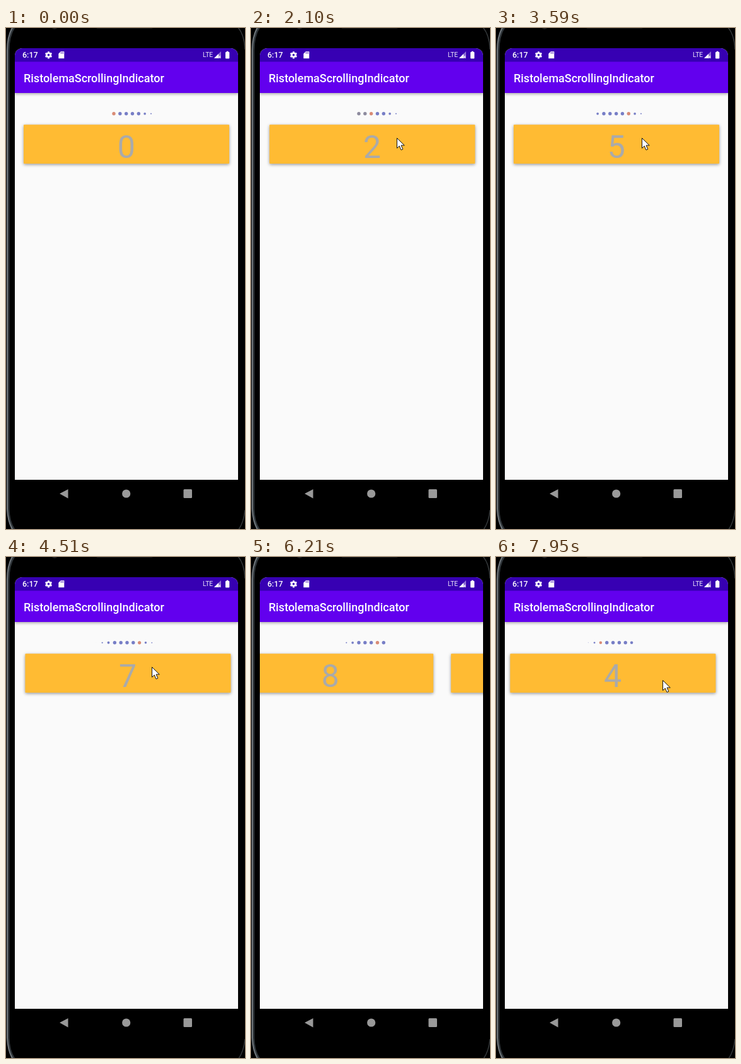
An HTML page with a canvas for the animation above (8000 ms loop, 379 px wide and 794 px high).

```html
<!DOCTYPE html>
<html lang="en">
<head>
<meta charset="utf-8">
<title>Pager with scrolling dots</title>
<style>
  html, body { margin: 0; width: 100%; height: 100%; overflow: hidden; background: #000; }
  canvas { display: block; }
</style>
</head>
<body>
<canvas id="stage" width="379" height="794"></canvas>
<script>
const ctx = document.getElementById('stage').getContext('2d');
const LOOP = 8000, PAGES = 10, PITCH = 354, DOT_PITCH = 9.83;
const SELECT_DELAY = 165, WINDOW_TIME = 260, RELEASE = 140;

const swipes = [
  ...[1162, 1702, 2192, 2674, 3150, 3640, 4121, 4620, 5200].map(at => ({ at, dir: 1, time: 430 })),
  ...[6002, 6450, 6874, 7270, 7660].map(at => ({ at, dir: -1, time: 335 }))
];

const clamp = v => Math.max(0, Math.min(1, v));
const mix = (a, b, u) => a + (b - a) * u;
const swipeEase = u => 1 - (1 - clamp(u) ** 1.5) ** 2.5;

// Pointer path as [time, x, y]
const path = [[40, 175, 800], [450, 318, 420], [800, 250, 182], [990, 257, 189]];
swipes.forEach(({ at, dir }, i) => {
  if (i === 0) {
    path.push([at, 257, 189], [at + 140, -8, 222], [at + 175, -8, 222], [at + 400, 231, 174]);
  } else if (dir > 0) {
    path.push([at, 231, 174], [at + 47, 141, 176], [at + 140, 75, 180], [at + 390, 231, 174]);
  } else {
    const first = swipes[i - 1].dir > 0;
    if (first) path.push([at - 170, 262, 195]);
    path.push([at, 262, 195], [at + 47, 332, 194], [at + 140, first ? 392 : 345, 196]);
    if (first) path.push([at + 240, 392, 196]);
    path.push([at + (first ? 400 : 290), 264, 195]);
  }
});

function pointerAt(t) {
  const next = path.findIndex(p => p[0] > t);
  if (next === 0) return path[0].slice(1);
  if (next < 0) return path[path.length - 1].slice(1);
  const a = path[next - 1], b = path[next];
  const u = (t - a[0]) / (b[0] - a[0]);
  return [mix(a[1], b[1], u), mix(a[2], b[2], u)];
}

function pagerAt(t) {
  let position = 0, page = 0, first = 0;
  for (const { at, dir, time } of swipes) {
    if (t < at) break;
    position += dir * swipeEase((t - at) / time);
    if (t < at + SELECT_DELAY) continue;
    page += dir;
    const target = dir > 0 ? Math.max(first, page - 4) : Math.min(first, page);
    first = mix(first, target, clamp((t - at - SELECT_DELAY) / WINDOW_TIME));
  }
  return { position, page, first };
}

function rect(x, y, w, h, color, radius = 0) {
  ctx.fillStyle = color;
  ctx.beginPath();
  ctx.roundRect(x, y, w, h, radius);
  ctx.fill();
}

function circle(x, y, r, color) {
  ctx.fillStyle = color;
  ctx.beginPath();
  ctx.arc(x, y, r, 0, 7);
  ctx.fill();
}

function shape(d, color, x = 0, y = 0) {
  ctx.save();
  ctx.translate(x, y);
  ctx.fillStyle = color;
  ctx.fill(new Path2D(d));
  ctx.restore();
}

function text(s, x, y, font, color, align = 'left') {
  ctx.font = font + ' Roboto, sans-serif';
  ctx.fillStyle = color;
  ctx.textAlign = align;
  ctx.fillText(s, x, y);
}

function shadowed(blur, dy, alpha, draw) {
  ctx.save();
  ctx.shadowColor = `rgba(0,0,0,${alpha})`;
  ctx.shadowBlur = blur;
  ctx.shadowOffsetY = dy;
  draw();
  ctx.restore();
}

function drawPhone() {
  rect(0, 0, 379, 794, '#000');
  const edge = (d, color, width) => {
    ctx.strokeStyle = color;
    ctx.lineWidth = width;
    ctx.stroke(new Path2D(d));
  };
  edge('M13 -2Q3.5 12 3.5 36V762Q4 783 13 796', '#30363a', 4);
  edge('M11 -2Q2 12 2 36V762Q3 783 11 796', '#70777c', 2);
  edge('M367 -2Q378 10 379 34M379 764Q377 784 368 796', '#34383a', 1.5);
  circle(77, -3, 5, '#202020');
  rect(143, -4, 90, 5, '#1b1b1b', 3);
  shape('M85 738L98.5 731V745.5Z', '#999');
  circle(190.7, 738, 6.6, '#999');
  rect(281.5, 731, 13.5, 14, '#999', 1.5);
}

function drawBars() {
  shadowed(4, 1.5, 0.3, () => rect(14, 53, PITCH, 50, '#6200ee'));
  rect(14, 32, PITCH, 21.5, '#3700b3');
  text('6:17', 26, 47.3, '500 12.5px', '#fff');
  for (let i = 0; i < 6; i++) {
    ctx.save();
    ctx.translate(67.5, 42.8);
    ctx.rotate(i * Math.PI / 3);
    rect(-1.5, -5.6, 3, 4, '#fff', 0.5);
    ctx.restore();
  }
  circle(67.5, 42.8, 4.2, '#fff');
  circle(67.5, 42.8, 1.8, '#3700b3');
  shape('M3.5 0H9V11H0V3.5Z', '#fff', 83.3, 37.3);
  for (let i = 0; i < 3; i++) rect(86.6 + i * 1.8, 38.6, 0.9, 2, '#3700b3');
  text('LTE', 312, 46.3, '400 10.3px', '#e8e0f8');
  shape('M11 0V11H0Z', '#8f70d5', 330, 37);
  shape('M7 4V11H0Z', '#fff', 330, 37);
  text('x', 336.7, 48.2, '500 8px', '#fff');
  rect(348, 38, 6.3, 10.5, '#fff', 1);
  rect(349.8, 36.8, 2.7, 2, '#fff');
  text('RistolemaScrollingIndicator', 28, 86, '500 18px', '#fff');
}

function drawDots({ page, first }) {
  for (let i = 0; i < PAGES; i++) {
    const slot = i - first;
    const outside = Math.max(0, -slot, slot - 4);
    if (outside >= 3) continue;
    const r = Math.max(0, outside < 2 ? 2.7 - outside * 0.85 : 3 - outside);
    const visited = first === 0 && i < page || first === 5 && i > page && i < 9;
    const color = i === page ? '#d98c76' : visited ? '#8d8b9e' : '#777ec6';
    circle(171 + slot * DOT_PITCH, 135.8, r, color);
  }
}

function drawCards({ position }) {
  for (let i = 0; i < PAGES; i++) {
    const x = 28 + (i - position) * PITCH;
    if (x > 375 || x < -330) continue;
    shadowed(5, 1.5, 0.4, () => rect(x, 153.3, 326, 61.7, '#ffbb33', 1));
    text(i, x + 162.7, 206, '400 50px', '#aaa', 'center');
  }
}

function drawPointer(t) {
  const [x, y] = pointerAt(t);
  if (swipes.some(({ at }) => t > at - 20 && t < at + RELEASE)) {
    circle(x, y, 12, 'rgba(255,219,20,.93)');
  }
  const arrow = new Path2D('M0 0V16L3.8 12.5L6.5 18.8L9.3 17.6L6.6 11.5H11.8Z');
  ctx.save();
  ctx.translate(x + 0.5, y + 0.5);
  ctx.fillStyle = '#fff';
  ctx.strokeStyle = '#111';
  ctx.lineWidth = 1;
  ctx.fill(arrow);
  ctx.stroke(arrow);
  ctx.restore();
}

function frame(now) {
  const t = now % LOOP;
  const pager = pagerAt(t);
  drawPhone();
  ctx.save();
  ctx.beginPath();
  ctx.roundRect(14, 32, PITCH, 684, [12, 12, 0, 0]);
  ctx.clip();
  rect(14, 32, PITCH, 684, '#fafafa');
  drawCards(pager);
  drawDots(pager);
  drawBars();
  ctx.restore();
  drawPointer(t);
  requestAnimationFrame(frame);
}
requestAnimationFrame(frame);
</script>
</body>
</html>
```
